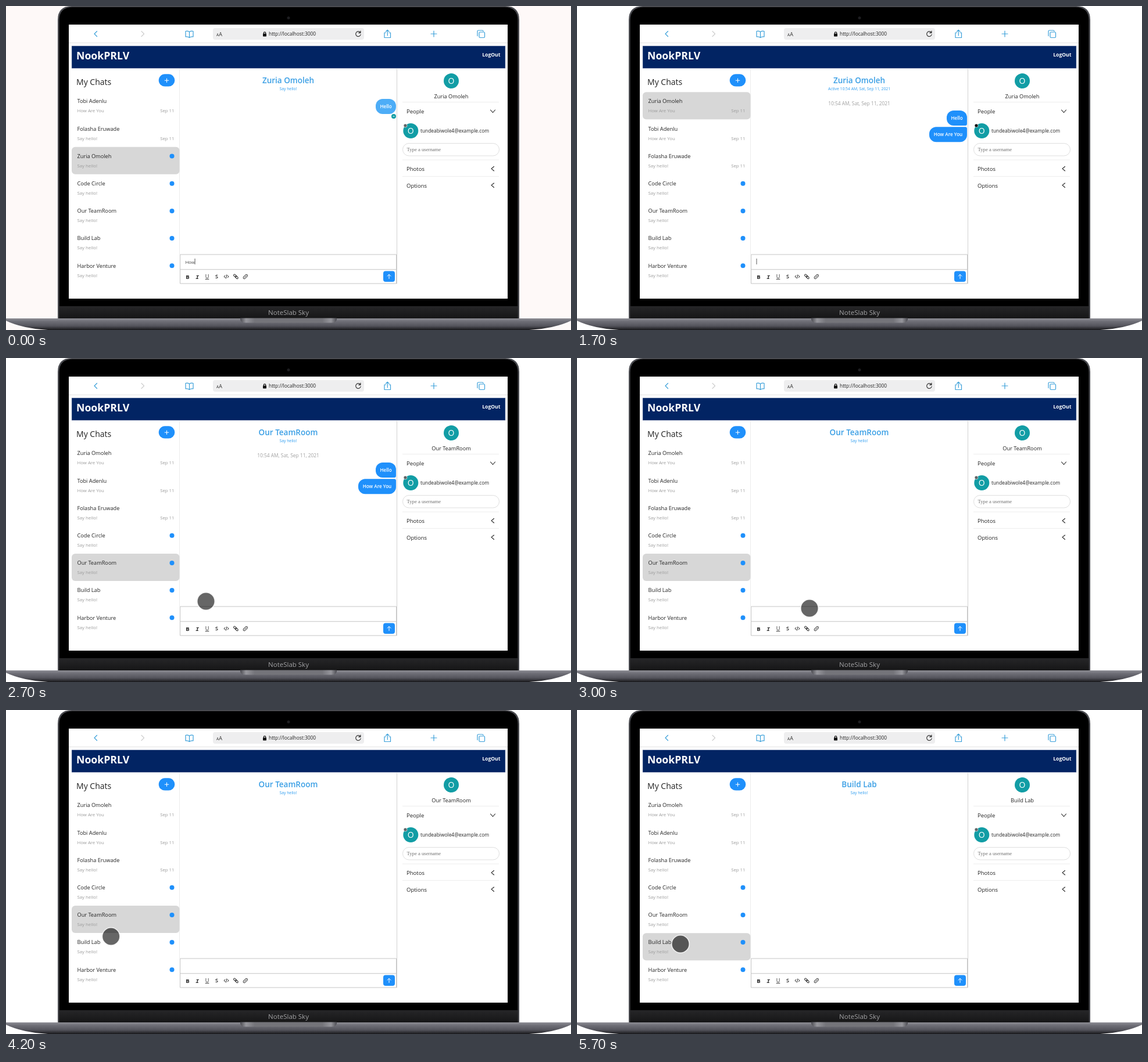
An HTML page for the animation above (5.8 s loop, 972 by 558 pixels).

```html
<!DOCTYPE html>
<html lang="en">
<head>
<meta charset="utf-8">
<title>Chat on a laptop</title>
<style>
html, body { margin: 0; width: 100%; height: 100%; overflow: hidden; background: #fff; }
svg { display: block; width: 972px; height: 558px; font-family: "Open Sans", "Noto Sans", sans-serif; }
.line { fill: none; stroke-linecap: round; stroke-linejoin: round; }
</style>
</head>
<body>
<svg viewBox="0 0 972 558">
  <defs>
    <linearGradient id="chin" x2="0" y2="1"><stop stop-color="#262628"/><stop offset="1" stop-color="#161617"/></linearGradient>
    <linearGradient id="base" x2="0" y2="1">
      <stop stop-color="#8e8e95"/><stop offset=".25" stop-color="#6f6f77"/>
      <stop offset=".65" stop-color="#54545c"/><stop offset="1" stop-color="#17171a"/>
    </linearGradient>
    <linearGradient id="notch">
      <stop stop-color="#4c4c52"/><stop offset=".06" stop-color="#96969c"/><stop offset=".15" stop-color="#74747a"/>
      <stop offset=".85" stop-color="#74747a"/><stop offset=".94" stop-color="#96969c"/><stop offset="1" stop-color="#4c4c52"/>
    </linearGradient>
  </defs>

  <!-- laptop -->
  <path d="M89 540V24Q89 0 113 0H859Q883 0 883 24V540Z" fill="#4a4b50"/>
  <path d="M91.500 538V25Q91.500 2 114.500 2H857.500Q880.500 2 880.500 25V538Z"/>
  <path d="M91.500 517H880.500V538H91.500Z" fill="url(#chin)"/>
  <circle cx="486" cy="20.500" r="2.500" fill="#1d1d20"/>
  <text x="486" y="532" font-size="11.500" text-anchor="middle" fill="#a2a2a4">NoteSlab Sky</text>
  <path d="M0 538H972V542Q945 555 900 558H72Q27 555 0 542Z" fill="url(#base)"/>
  <path d="M403 537.500H569V540Q568 545.500 560 545.500H412Q404 545.500 403 540Z" fill="url(#notch)"/>
  <path d="M108 32H863V504H108Z" fill="#fff"/>

  <!-- browser bar -->
  <path d="M108 63.500H863" stroke="#e4e4e4"/>
  <rect x="356" y="38" width="260" height="20" rx="4" fill="#eeeeef"/>
  <g class="line" stroke="#399fd9" stroke-width="1.200">
    <path d="M156.500 43.500L152 48L156.500 52.500"/>
    <path d="M233 43.500L237.500 48L233 52.500" stroke="#cfcfcf"/>
    <path d="M315.500 44.500V54.500M315.500 44.500Q312 42.500 309 43.500V53Q313 52.500 315.500 54.500Q318 52.500 322 53V43.500Q319 42.500 315.500 44.500"/>
    <path d="M653.500 46H651V54.500H661.500V46H659M656.300 51V41.500M653.500 44L656.300 41.300L659 44"/>
    <path d="M736 43V53M731 48H741"/>
    <rect x="814" y="45" width="9.500" height="9.500" rx="1.500"/>
    <path d="M811 51.500V43.500Q811 42 812.500 42H819.500Q821 42 821 43.500"/>
    <path d="M609.800 46.200A4.300 4.300 0 1 0 610.200 49M609.900 43V46.300H606.700" stroke="#333"/>
    <path d="M443.300 48V46.500A1.700 1.700 0 0 1 446.700 46.500V48" stroke="#111"/>
  </g>
  <rect x="442" y="47.500" width="6" height="5" rx=".8" fill="#111"/>
  <text x="362" y="51.500" font-size="6.500" fill="#333">A<tspan font-size="9">A</tspan></text>
  <text x="452" y="51.200" font-size="8.400" fill="#222">http://localhost:3000</text>

  <!-- page frame -->
  <rect x="113" y="68.800" width="746" height="38.500" fill="#022463" stroke="#b9c0d4" stroke-width=".5"/>
  <text x="121" y="92" font-size="17.700" font-weight="700" fill="#fff">NookPRLV</text>
  <text x="850.500" y="87.300" font-size="8.600" font-weight="700" text-anchor="end" fill="#fff">LogOut</text>
  <text x="121" y="135.800" font-size="14" fill="#222">My Chats</text>
  <rect x="262.700" y="117.300" width="27.600" height="21.300" rx="10.600" fill="#1f90fb"/>
  <path class="line" d="M276.500 125V131.500M273.200 128.200H279.800" stroke="#fff"/>
  <path d="M298.500 108V428" stroke="#ececec"/>
  <path class="line" d="M672.500 108V478" stroke="#d2d2d2"/>
  <path d="M299.500 428H671.500V478H299.500ZM299.500 453.800H671.500" fill="none" stroke="#c4c4c4"/>

  <!-- editor tools -->
  <g fill="#222" font-size="9.500" text-anchor="middle">
    <text x="312.500" y="469.500" font-weight="700">B</text>
    <text x="329" y="469.500" font-family="Liberation Mono, monospace" font-style="italic" font-weight="700">I</text>
    <text x="346" y="469" text-decoration="underline" font-size="9">U</text>
    <text x="362.500" y="469.300" font-size="9" font-weight="600">S</text>
  </g>
  <g class="line" stroke="#222">
    <path d="M377 464L375 466L377 468M381 464L383 466L381 468M379.800 463L378.300 469"/>
    <rect x="-2.800" y="-1.500" width="5.600" height="3" rx="1.500" transform="translate(394 464.500) rotate(45)"/>
    <rect x="-2.800" y="-1.500" width="5.600" height="3" rx="1.500" transform="translate(396.800 467.300) rotate(45)"/>
    <path d="M413.500 464.500L410.500 467.500M409 466L412 463Q414 461.700 415.200 463Q416 464.500 414.800 466L411.500 469.300Q409.800 470.500 408.500 469.300Q407.400 467.800 409 466"/>
  </g>
  <rect x="649" y="456.500" width="20" height="18.500" rx="4" fill="#1f90fb"/>
  <path class="line" d="M659 469.500V462.500M656 465.300L659 462.300L662 465.300" stroke="#fff"/>

  <!-- details -->
  <path d="M682 165.500H848M682 265H848M682 293.500H848" stroke="#ededed"/>
  <rect x="682.500" y="236.500" width="166" height="21.500" rx="10.700" fill="#fff" stroke="#dedede"/>
  <text x="689.500" y="250" font-family="Liberation Serif, serif" font-size="8.700" fill="#707070">Type a username</text>
  <g font-size="9.500" font-weight="500" fill="#222">
    <text x="689" y="184.500">People</text><text x="689" y="283.500">Photos</text><text x="689" y="312.500">Options</text>
  </g>
  <path class="line" d="M833.500 179L837.500 183.500L841.500 179M839.500 276.500L835 280.200L839.500 284M839.500 305L835 308.700L839.500 312.500" stroke="#222" stroke-width="1.100"/>
  <g fill="#129da5"><circle cx="766" cy="129" r="13"/><circle cx="696.300" cy="215" r="13"/></g>
  <g font-size="14" text-anchor="middle" fill="#fff"><text x="766" y="134">O</text><text x="696.300" y="220">O</text></g>
  <text x="713" y="218" font-size="8.400" fill="#222">tundeabiwole4@example.com</text>

  <g id="live"></g>
</svg>
<script>
const LOOP = 5800, STEP = 100;
const BLUE = '#1f90fb', PALE = '#4dadf7';
const live = document.getElementById('live');

const friend = 'Zuria Omoleh', team = 'Our TeamRoom', lab = 'Build Lab';
const others = [['Tobi Adenlu', 'How Are You', 1], ['Folasha Eruwade', 'Say hello!', 1]];
const groups = ['Code Circle', team, lab, 'Harbor Venture'].map(name => [name, 'Say hello!', 0]);

// pointer keys: time, x, y
const path = [
  [1900, 290, 412], [2100, 228, 388], [2300, 178, 364], [2500, 186, 367], [2700, 344, 419],
  [3000, 400, 431], [3400, 400, 431], [3500, 338, 416], [3700, 200, 387], [4000, 182, 384],
  [4600, 178, 402], [4700, 178, 403], [LOOP, 178, 403]
];

const text = (x, y, size, fill, str, extra = '') =>
  `<text x="${x}" y="${y}" font-size="${size}" fill="${fill}" ${extra}>${str}</text>`;
const dot = (x, y, r, fill, extra = '') =>
  `<circle cx="${x}" cy="${y}" r="${r}" fill="${fill}" ${extra}/>`;
const middle = 'text-anchor="middle"';

function row([name, note, dated], i, selected) {
  const y = 148.300 + 47.200 * i;
  return (selected ? `<rect x="113" y="${y}" width="185.500" height="47" rx="6" fill="#d7d7d7"/>` : '')
    + text(122.500, y + 19, 9.200, '#222', name)
    + text(122.500, y + 35, 7.800, '#9c9c9c', note)
    + (dated ? text(289.500, y + 35, 7.800, '#9c9c9c', 'Sep 11', 'text-anchor="end"') : dot(285.500, y + 15.800, 4, BLUE));
}

// top and bottom are the radii of the right-hand corners
function bubble(y, width, str, fill, top, bottom) {
  const x = 671 - width, end = y + 26, r = 12;
  return `<path d="M${x + r} ${y}H${671 - top}A${top} ${top} 0 0 1 671 ${y + top}V${end - bottom}`
    + `A${bottom} ${bottom} 0 0 1 ${671 - bottom} ${end}H${x + r}A${r} ${r} 0 0 1 ${x} ${end - r}`
    + `V${y + r}A${r} ${r} 0 0 1 ${x + r} ${y}Z" fill="${fill}"/>`
    + text(x + width / 2, y + 16, 8.100, '#fff', str, middle + ' font-weight="600"');
}

const receipt = y => dot(667, y, 4, '#129da5') + `<path d="M665.500 ${y}H668.500" stroke="#fff"/>`;

function messages(t) {
  if (t >= 2900) return '';
  if (t < 300) return bubble(160, 35, 'Hello', PALE, 12, 12) + receipt(190);
  const replied = t >= 700;
  let out = text(485.500, 171, 8.400, '#a0a0a0', '10:54 AM, Sat, Sep 11, 2021', middle)
    + bubble(180, 35, 'Hello', BLUE, 12, replied ? 3 : 12);
  if (replied) out += bubble(208.300, 65, 'How Are You', t < 1700 ? PALE : BLUE, 3, 12);
  if (t < 1700) out += receipt(replied ? 238.500 : 210);
  return out;
}

function editor(t) {
  if (t >= 2400) return '';
  const typed = t < 100 ? 'How' : t < 300 ? 'How Ar' : t < 400 ? 'How Are Yo' : t < 700 ? 'How Are You' : '';
  return `<text x="308.500" y="443.500" font-size="8" fill="#555" font-family="Liberation Sans, sans-serif">${typed}`
    + `<tspan id="end">\u200b</tspan></text><path id="caret" d="M0 435V445" stroke="#444" stroke-width=".9"/>`;
}

function pointer(t) {
  const i = path.findIndex(key => key[0] > t);
  if (i < 1) return '';
  const [t0, x0, y0] = path[i - 1], [t1, x1, y1] = path[i];
  const k = (t - t0) / (t1 - t0);
  return dot(x0 + (x1 - x0) * k, y0 + (y1 - y0) * k, 15.200, '#000',
    'fill-opacity=".6" stroke="#fff" stroke-opacity=".85" stroke-width="1.500"');
}

function draw(t) {
  const delivered = t >= 300;
  const me = [friend, !delivered ? 'Say hello!' : t < 1700 ? 'Hello' : 'How Are You', delivered];
  const rows = (delivered ? [me, ...others] : [...others, me]).concat(groups);
  const chat = t < 2400 ? friend : t < 5700 ? team : lab;
  const active = delivered && t < 2400;

  document.body.style.background = t < 100 ? '#fef9f8' : '#fff';
  live.innerHTML = rows.map((r, i) => row(r, i, r[0] === chat)).join('')
    + text(485.500, 133, 13.500, '#3a9fe5', chat, middle + ' font-weight="600"')
    + text(485.500, 145.300, 6.800, '#2e9df0', active ? 'Active 10:54 AM, Sat, Sep 11, 2021' : 'Say hello!', middle)
    + text(766, 159.200, 9.200, '#222', chat, middle)
    + dot(687, 206, 3, active ? '#111' : '#626668', 'stroke="#fff" stroke-width=".6"')
    + messages(t) + editor(t) + pointer(t);

  const caret = document.getElementById('caret');
  if (caret) {
    const line = document.getElementById('end').parentNode;
    caret.setAttribute('transform', `translate(${309 + line.getComputedTextLength()} 0)`);
  }
}

const start = performance.now();
let shown = -1;
function tick() {
  const t = Math.floor((performance.now() - start) % LOOP / STEP) * STEP;
  if (t !== shown) draw(shown = t);
  requestAnimationFrame(tick);
}
tick();
</script>
</body>
</html>
```
